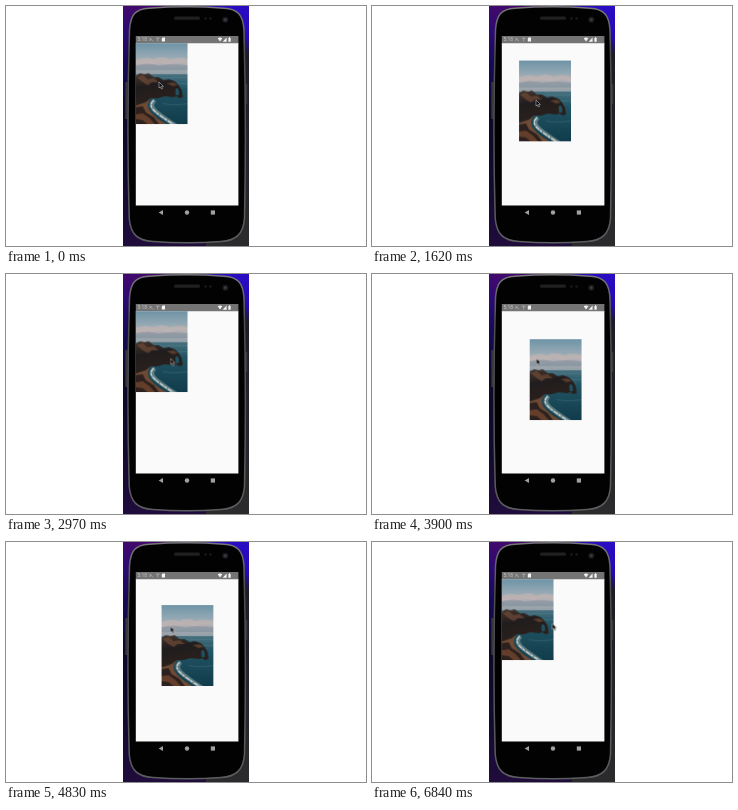
An HTML page for the animation above (6870 ms loop, 360x240 px).

```html
<!DOCTYPE html>
<html lang="en">
<head>
<meta charset="utf-8">
<title>Moving picture on a phone</title>
<style>
html, body { margin: 0; width: 100%; height: 100%; overflow: hidden; background: #fff; }
svg { display: block; width: 360px; height: 240px; }
text { font: 5px Roboto, sans-serif; fill: #c4c4c4; }
#photo { animation: slide 6870ms infinite; }
#cursor { animation: point 6870ms infinite linear; }

/* Springs out to 100dp, then eases back over two seconds. */
@keyframes slide {
  0%, .44% { transform: translate(129.7px, 37.2px); animation-timing-function: cubic-bezier(.25, .8, .35, 1.08); }
  6.3%, 11.35% { transform: translate(157.5px, 65px); animation-timing-function: ease-in; }
  25.91% { transform: translate(143.6px, 51.1px); animation-timing-function: ease-out; }
  40.47%, 52.7% { transform: translate(129.7px, 37.2px); animation-timing-function: cubic-bezier(.25, .8, .35, 1.08); }
  58.5%, 65.79% { transform: translate(157.5px, 65px); animation-timing-function: ease-in; }
  80.35% { transform: translate(143.6px, 51.1px); animation-timing-function: ease-out; }
  94.9%, 100% { transform: translate(129.7px, 37.2px); }
}
@keyframes point {
  0%, 12% { transform: translate(153px, 76px); }
  22%, 36% { transform: translate(164px, 94px); }
  43%, 73% { transform: translate(164.5px, 84.5px); }
  82%, 88% { transform: translate(167px, 89px); }
  97%, 100% { transform: translate(180.3px, 81.5px); }
}
</style>
</head>
<body>
<svg viewBox="0 0 360 240">
  <defs>
    <linearGradient id="desk" x2="0" y2="1">
      <stop offset="0" stop-color="#43096c"/>
      <stop offset=".1" stop-color="#2c0a72"/>
      <stop offset=".25" stop-color="#170a55"/>
      <stop offset=".45" stop-color="#0d0a26"/>
      <stop offset=".75" stop-color="#140a30"/>
      <stop offset="1" stop-color="#1f0c3c"/>
    </linearGradient>
    <linearGradient id="deskRight" x2="0" y2="1">
      <stop offset="0" stop-color="#2a0cc4"/>
      <stop offset=".13" stop-color="#2509b4"/>
      <stop offset=".2" stop-color="#1c1c24"/>
      <stop offset="1" stop-color="#2b2b2d"/>
    </linearGradient>
    <linearGradient id="rim" x2="0" y2="1">
      <stop offset="0" stop-color="#77787a"/>
      <stop offset=".2" stop-color="#4c4d4f"/>
      <stop offset="1" stop-color="#5c5d5f"/>
    </linearGradient>
    <linearGradient id="sky" x2="0" y2="1">
      <stop offset="0" stop-color="#6f94a6"/>
      <stop offset=".4" stop-color="#94a9b4"/>
      <stop offset=".65" stop-color="#b5b0b3"/>
      <stop offset="1" stop-color="#8b9ca6"/>
    </linearGradient>
    <linearGradient id="sea" x2="0" y2="1">
      <stop offset="0" stop-color="#48717f"/>
      <stop offset=".3" stop-color="#215464"/>
      <stop offset="1" stop-color="#103b4a"/>
    </linearGradient>
    <linearGradient id="rock" x2=".3" y2="1">
      <stop offset="0" stop-color="#4a382f"/>
      <stop offset=".45" stop-color="#211d1e"/>
      <stop offset="1" stop-color="#2b211d"/>
    </linearGradient>
    <clipPath id="screen"><path d="M129.8 37h102.6v162.6h-102.6z"/></clipPath>
    <clipPath id="frame"><path d="M0 0h51.2v80.9H0z"/></clipPath>
  </defs>

  <path fill="url(#desk)" d="M117 0h84v240h-84z"/>
  <path fill="url(#deskRight)" d="M200 0h43v240h-43z"/>

  <g id="phone">
    <path fill="#38383c" d="M119.3 76h2.2v37h-2.2zM239.5 78h1.8v20h-1.8z"/>
    <path fill="#020203" stroke="url(#rim)" stroke-width="1.5"
      d="M143 2.2Q181-.6 218 2.2C232 3 237 9 238 24Q240.5 120 238.5 212C237.5 228 230 234.5 215 235.6Q181 238 147 235.6C131 234.5 124.5 228 123.2 212Q120.5 120 123.5 24C124.5 9 129 3 143 2.2Z"/>
    <rect x="168" y="10.6" width="26" height="3.2" rx="1.6" fill="#202022"/>
    <g fill="#1d1d20">
      <circle cx="199.5" cy="12.5" r="1.2"/>
      <circle cx="204.5" cy="12.5" r="1.2"/>
      <circle cx="219.3" cy="13.8" r="3"/>
    </g>
    <circle cx="219.3" cy="13.8" r="1.2" fill="#3a4250"/>
    <path fill="#fafafa" d="M129.8 37h102.6v162.6h-102.6z"/>
    <path fill="#747474" d="M129.8 30h102.6v7.2h-102.6z"/>
    <text x="131.5" y="35.4">5:18</text>
    <path fill="none" stroke="#bbb" stroke-width=".7"
      d="M143.5 31.8l3.4 3.6M143.3 34.8l2-2.6M150 32.2h3.5M151.7 32.2v3.2"/>
    <path fill="#f4f4f4" d="M156.6 31.5h2.4v4h-3.2v-3.1zM211.7 32.3q2.3-1.4 4.6 0L214 35.6zM220.6 31.4v4.3h-3.9zM222.4 32h.6v-.7h1.1v.7h.6v3.8h-2.3z"/>
    <g fill="#a0a0a0">
      <path d="M157 204v5l-4.4-2.5z"/>
      <circle cx="181" cy="206.5" r="2.2"/>
      <path d="M204.8 204.4h4.2v4.2h-4.2z"/>
    </g>
  </g>

  <g clip-path="url(#screen)">
    <g id="photo">
      <g clip-path="url(#frame)">
        <path fill="url(#sky)" d="M0 0h52v33H0z"/>
        <path fill="#c9b6b3" opacity=".6" d="M0 17q9-4 17-1 9-4 17 0 9-3 18 0v4q-12-2-20 1-9-3-16 0-7-1-16 1z"/>
        <path fill="#75899a" opacity=".5" d="M0 22q12-3 23 0 15-2 29 0v5H0z"/>
        <path fill="url(#sea)" d="M0 31h52v51H0z"/>
        <path fill="#65909a" opacity=".3" d="M24 34h28v1H24zM42 40h10v1H42zM27 60q10 2 25 0v1q-14 2-25 0z"/>
        <path fill="none" stroke="#8fa6a8" stroke-width="4" opacity=".6" d="M19 57Q13 62 20 68T41 83"/>
        <path fill="none" stroke="#dcdcd6" stroke-width="1.3" stroke-dasharray="5 .7 3 1.2" d="M18 57Q12 62 19 68T39 82"/>
        <path fill="#6f4a35" d="M0 56l15-1Q9 62 15 69T33 82H0z"/>
        <path fill="url(#rock)" fill-rule="evenodd" d="M0 33l4-3 5 1 4-1 5 4 5 0 5 3 5-1 6 2 4 4 3 5 1 7-4 1-2-2-4 1-8-1-7 2-7 0-5 4-9 3-6 0zM40 52q-1-7 1-7 3 1 2 7z"/>
        <path fill="#7a5039" opacity=".6" d="M1 34l6-2 5 4 6-1 5 4-7 0-4 3-5-3zM31 40l7-1 4 3-5 1z"/>
        <path fill="#2c211e" d="M0 64l7-1 3 6 8 5 6 8H0z"/>
        <path fill="#75482f" opacity=".75" d="M0 71l7-1 7 5 6 7h-7l-6-5-7-1z"/>
      </g>
    </g>
  </g>
  <g id="cursor">
    <path fill="#080808" stroke="#ddd" stroke-width=".5" d="M0 0v6l1.4-1.2 1 2.2 1.1-.5-1-2.1h1.9z"/>
  </g>
</svg>
</body>
</html>
```
